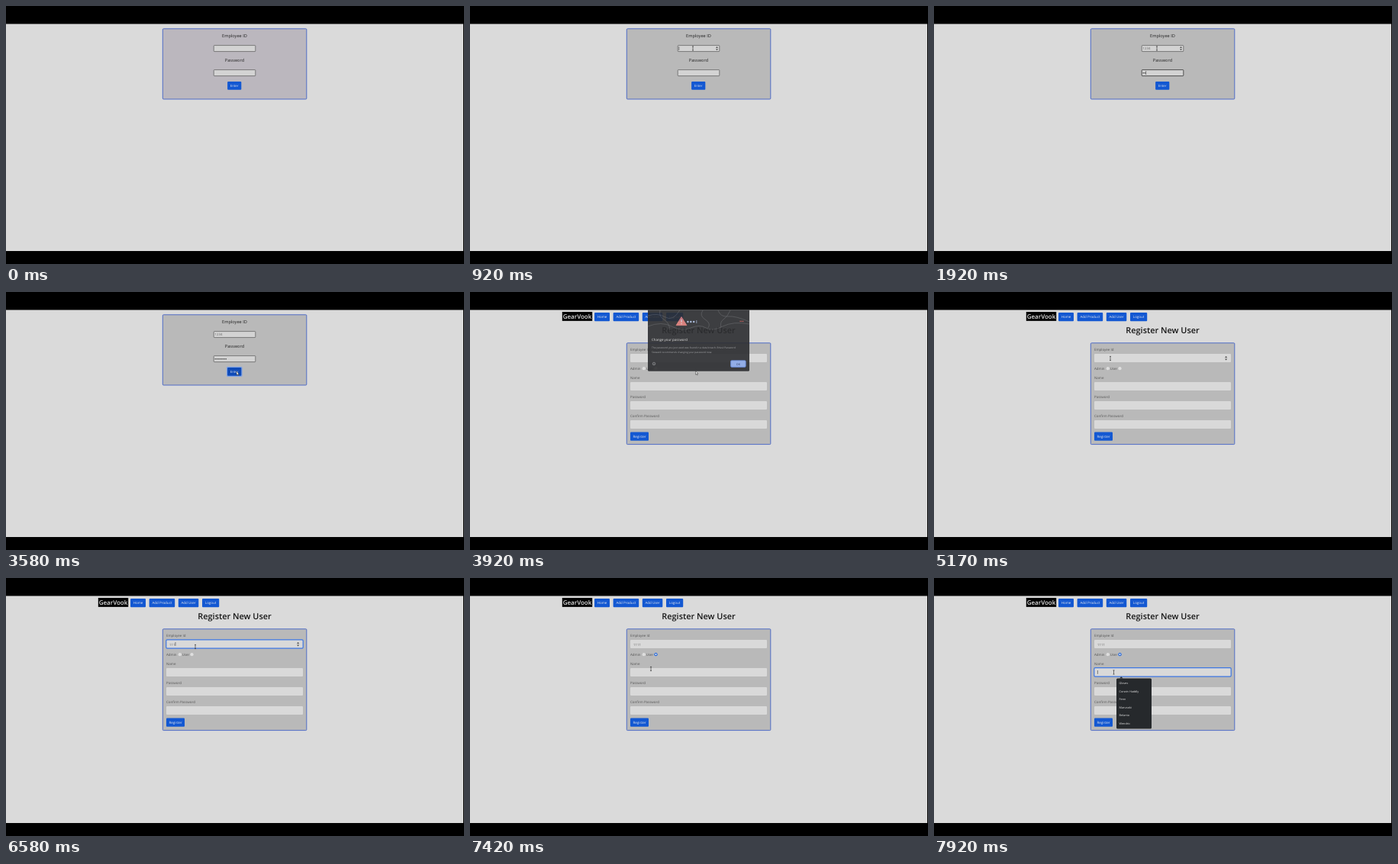
An HTML page that plays this animation: 600 by 338 pixels, repeating every 8 s.

```html
<!DOCTYPE html>
<html lang="en">
<head>
<meta charset="utf-8">
<title>Register a user</title>
<style>
  html, body { margin: 0; width: 100%; height: 100%; overflow: hidden; background: #000; }
  svg { display: block; width: 100vw; height: 100vh; }
  text { font-family: "Open Sans", "Noto Sans", sans-serif; text-rendering: geometricPrecision; }
  .mid { text-anchor: middle; }
  .panel { fill: #b9b9b9; stroke: #4261c6; stroke-width: .9; }
  .btn { fill: #1358d2; }
  .cap { font-size: 4.5px; fill: #e2e5ec; text-anchor: middle; }
  .big { font-size: 5.65px; fill: #252525; text-anchor: middle; }
  .label { font-size: 4.45px; fill: #555; }
  .box { fill: #d3d3d3; stroke: #656565; stroke-width: .8; }
  .field { fill: #d9d9d9; }
  .value { font-size: 4.4px; fill: #686868; }
  .ring { fill: #d9d9d9; stroke: #3c76e2; stroke-width: 1.2; }
  .caret { stroke: #333; stroke-width: .6; }
  .spin { fill: #4c4c4c; }
  .item { font-size: 3.75px; fill: #e4e4e4; }
  .map { fill: none; stroke: #66686d; stroke-width: .5; }
</style>
</head>
<body>
<svg viewBox="0 0 600 338" preserveAspectRatio="none">
  <rect width="600" height="338"/>
  <rect y="23.5" width="599" height="297.5" fill="#dadada"/>

  <g id="login">
    <rect id="loginPanel" class="panel" x="205.3" y="29.8" width="188.5" height="92.2" rx="1"/>
    <text class="big" x="299.5" y="40.8">Employee ID</text>
    <rect class="box" x="272.2" y="51.6" width="54.6" height="8" rx=".8"/>
    <text class="value" id="loginId" x="273.4" y="57.3"></text>
    <path class="spin" id="loginSpin" d="M322 54.9l1.5-2 1.5 2zM322 56.3l1.5 2 1.5-2z"/>
    <text class="big" x="299.5" y="72.8">Password</text>
    <rect class="box" id="passBox" x="272.2" y="83.6" width="54.6" height="8" rx=".8"/>
    <g id="dots" fill="#3a3a3a"></g>
    <rect id="enterRing" x="288.9" y="97.7" width="20.6" height="13.2" rx="1.6" fill="#7fa2e4"/>
    <rect id="enter" class="btn" x="290.1" y="98.9" width="18.2" height="10.9" rx="1"/>
    <text class="cap" x="299.2" y="106" style="font-size:4.3px">Enter</text>
  </g>

  <g id="register">
    <rect x="120.8" y="26" width="39.4" height="11.9"/>
    <text class="mid" x="140.5" y="35.2" font-size="8" font-weight="600" fill="#e2e2e2">GearVook</text>
    <g id="nav"></g>
    <text class="mid" x="299.5" y="54.3" font-size="10.9" font-weight="600" fill="#161616">Register New User</text>
    <rect class="panel" x="205.3" y="66.8" width="188.5" height="132.8" rx="1"/>
    <g id="form"></g>
    <rect class="ring" id="focus" x="209.8" width="179.4" height="11.4" rx="1.4"/>
    <text class="value" id="newId" x="214" y="88.6"></text>
    <path class="spin" id="newSpin" d="M381 86l1.6-2.1 1.6 2.1zM381 87.4l1.6 2.1 1.6-2.1z"/>
    <text class="label" x="210" y="102">Admin</text>
    <circle cx="227.8" cy="100.2" r="2.1" fill="#dedede"/>
    <text class="label" x="230.7" y="102">User</text>
    <circle id="userRadio" cx="243.5" cy="100.2" r="2.1"/>
    <circle id="userDot" cx="243.5" cy="100.2" r="1.1" fill="#e4e4e4"/>
    <g id="list">
      <path d="M243 131.6l2.3-2.4 2.3 2.4z" fill="#26292c"/>
      <rect x="239" y="131.4" width="46" height="66" rx="1.5" fill="#26292c"/>
    </g>
  </g>

  <g id="dialog">
    <path d="M233 23.5h133v78.8q0 1.5-1.5 1.5h-130q-1.5 0-1.5-1.5z" fill="#2d2e31"/>
    <g class="map">
      <path d="M233 31q13-4 23 2t19-9.500M233 45q18-7 31 0t25 2 20 0 22-2 35-3"/>
      <path d="M249 24q-2 8 5 12t8 14M305 24q-5 7 3 12t4 11M325 24q3 9 13 8t28 7M341 24q-4 9-9 12t-3 11"/>
    </g>
    <path d="M277 32.6l6.800 11h-13.600z" fill="#d97a76" stroke="#d97a76" stroke-linejoin="round"/>
    <path d="M277 36v3.700M277 41v1.200" stroke="#eee" stroke-width="1"/>
    <g fill="#a9bbdf">
      <circle cx="285.4" cy="39" r="1.200"/><circle cx="289.3" cy="39" r="1.200"/>
      <circle cx="293.200" cy="39" r="1.200"/><path d="M296.500 37h.7v4h-.7z"/>
    </g>
    <path d="M353.500 38.300h5" stroke="#b65652" stroke-width="1.200" stroke-dasharray="1.300 .5"/>
    <text x="238" y="64.100" font-size="4.400" fill="#e5e5e5">Change your password</text>
    <g font-size="3.250" fill="#a3a5a9">
      <text x="238" y="74">The password you just used was found in a data breach. Brivul Password</text>
      <text x="238" y="80.200">Steward recommends changing your password now.</text>
    </g>
    <g fill="none" stroke="#a3a5a9" stroke-width=".6">
      <circle cx="241" cy="94" r="1.800"/><path d="M241 92.800v.5M241 93.800v1.300"/>
    </g>
    <rect x="341.600" y="89.800" width="19.600" height="8.600" rx="1.300" fill="#8eacec" stroke="#5c7fd0" stroke-width=".9"/>
    <text class="mid" x="351.400" y="95.600" font-size="3.700" fill="#26365c">OK</text>
  </g>

  <path class="caret" id="caret"/>
  <g id="pointer">
    <path id="arrow" d="M0 0v4.700l1.100-1 .8 1.800.8-.4-.8-1.700h1.500z" fill="#f2f2f2" stroke="#222" stroke-width=".45"/>
    <path id="beam" d="M-1-2.600h2M0-2.600v5.200M-1 2.600h2" fill="none" stroke="#222" stroke-width=".6"/>
  </g>
</svg>

<script>
const LOOP = 8000, PAGE = 3670, CLOSE = 4420;
const $ = id => document.getElementById(id);
const show = (id, on) => $(id).setAttribute("visibility", on ? "visible" : "hidden");
const clamp = v => Math.max(0, Math.min(1, v));

function add(parent, tag, attrs, text) {
  const el = document.createElementNS("http://www.w3.org/2000/svg", tag);
  for (const k in attrs) el.setAttribute(k, attrs[k]);
  if (text) el.textContent = text;
  $(parent).appendChild(el);
  return el;
}

function button(parent, x, y, width, name) {
  add(parent, "rect", { class: "btn", x, y, width, height: 11.1, rx: 1 });
  add(parent, "text", { class: "cap", x: x + width / 2, y: y + 7.3 }, name);
}

button("nav", 163, 27.1, 20, "Home");
button("nav", 187.6, 27.1, 33.6, "Add Product");
button("nav", 225.8, 27.1, 26.5, "Add User");
button("nav", 257, 27.1, 22.2, "Logout");
button("form", 210, 183.6, 24, "Register");

[["Employee Id", 81], ["Name", 118], ["Password", 143], ["Confirm Password", 168]].forEach(([name, y]) => {
  add("form", "text", { class: "label", x: 210, y: y - 4 }, name);
  add("form", "rect", { class: "field", x: 210, y, width: 179, height: 11, rx: 1 });
});

["Gloves", "Corwin Haddly", "Fenn", "Marusoki", "Belanto", "Wendric"].forEach((name, i) =>
  add("list", "text", { class: "item", x: 242.6, y: 139.4 + i * 10.5 }, name));

const dots = Array.from({ length: 8 }, (_, i) =>
  add("dots", "circle", { cx: 274.2 + i * 2, cy: 87.7, r: .75 }));

// Key press times
const idKeys = [1000, 1170, 1330, 1500];
const passKeys = [1750, 1900, 2000, 2080, 2250, 2330, 2500, 2750];
const newKeys = [6250, 6420, 6500, 6750];
const typed = (keys, t) => keys.filter(k => k <= t).length;

// Pointer path: time, x, y
const path = [
  [80, 300, 124], [500, 293, 57], [750, 292, 55.5], [1930, 292, 55.5], [2080, 300, 101],
  [2330, 302, 104], [3600, 302, 104], [3920, 295.5, 103.5], [4300, 350, 94], [4450, 350, 94],
  [5080, 231, 87], [5400, 231, 87], [6080, 248, 90], [6920, 248, 90],
  [7170, 243.5, 100], [7270, 243.5, 100], [7480, 235.5, 123.5], [8000, 235.5, 123.5]
];

function pointerAt(t) {
  const i = path.findIndex(p => p[0] > t);
  if (i < 1) return path[0].slice(1);
  const [a, b] = [path[i - 1], path[i]];
  const u = clamp((t - a[0]) / (b[0] - a[0])), e = u * u * (3 - 2 * u);
  return [a[1] + (b[1] - a[1]) * e, a[2] + (b[2] - a[2]) * e];
}

// Text cursor for the focused field: x, y and the start of its blink
function caretAt(t) {
  const since = (keys, start) => Math.max(start, ...keys.filter(k => k <= t));
  if (t >= 7500) return [214.4, 123.4, 7500];
  if (t >= 7230) return null;
  if (t >= 5420) return [214.4 + $("newId").getComputedTextLength(), 86.5, since(newKeys, 5420)];
  if (t >= 2920) return null;
  if (t >= 1670) return [273.6 + typed(passKeys, t) * 2, 87.6, since(passKeys, 1670)];
  if (t >= 830) return [273.8 + $("loginId").getComputedTextLength(), 55.6, since(idKeys, 830)];
  return null;
}

function draw(t) {
  const first = t < PAGE;
  const [x, y] = pointerAt(t);
  const within = (l, top, r, b) => x > l && x < r && y > top && y < b;
  $("login").style.display = first ? "" : "none";
  $("register").style.display = first ? "none" : "";

  const k = clamp((t - 80) / 420);
  $("loginPanel").style.fill = `rgb(${187 - 2 * k},${183 + 2 * k},${190 - 5 * k})`;
  $("loginId").textContent = "1234".slice(0, typed(idKeys, t));
  const overLogin = first && t >= 80 && within(272, 51, 327, 60);
  show("loginSpin", overLogin);
  $("passBox").style.stroke = t >= 1670 && t < 2920 ? "#333" : "";
  dots.forEach((d, i) => d.setAttribute("visibility", t >= passKeys[i] ? "inherit" : "hidden"));
  const overEnter = t >= 80 && within(290, 99, 308, 110);
  $("enter").style.fill = overEnter ? "#0f4bb8" : "";
  show("enterRing", first && t >= 2920);

  const idFocus = t >= 5420 && t < 7230, nameFocus = t >= 7500;
  const overNew = !first && t > 4550 && within(210, 81, 389, 92);
  const overName = !first && within(210, 118, 389, 129);
  show("focus", idFocus || nameFocus);
  $("focus").setAttribute("y", nameFocus ? 117.7 : 80.8);
  $("newId").textContent = "1111".slice(0, typed(newKeys, t));
  show("newSpin", overNew);
  const picked = t >= 7230;
  $("userRadio").style.fill = picked ? "#1560e0" : "#dedede";
  show("userDot", picked);
  show("list", t >= 7580);

  const fade = t < CLOSE ? clamp((t - 3750) / 190) : 1 - clamp((t - CLOSE) / 80);
  $("dialog").setAttribute("opacity", fade);

  const c = caretAt(t);
  show("caret", c && (t - c[2]) % 1060 < 530);
  if (c) $("caret").setAttribute("d", `M${c[0]} ${c[1] - 2.4}v4.800`);

  const beam = overLogin || overNew || overName || (first && within(272, 83, 327, 92));
  $("pointer").setAttribute("transform", `translate(${x} ${y})`);
  show("arrow", t >= 80 && !beam);
  show("beam", t >= 80 && beam);
}

const start = performance.now();
function tick() {
  draw((performance.now() - start) % LOOP);
  requestAnimationFrame(tick);
}
tick();
</script>
</body>
</html>
```
